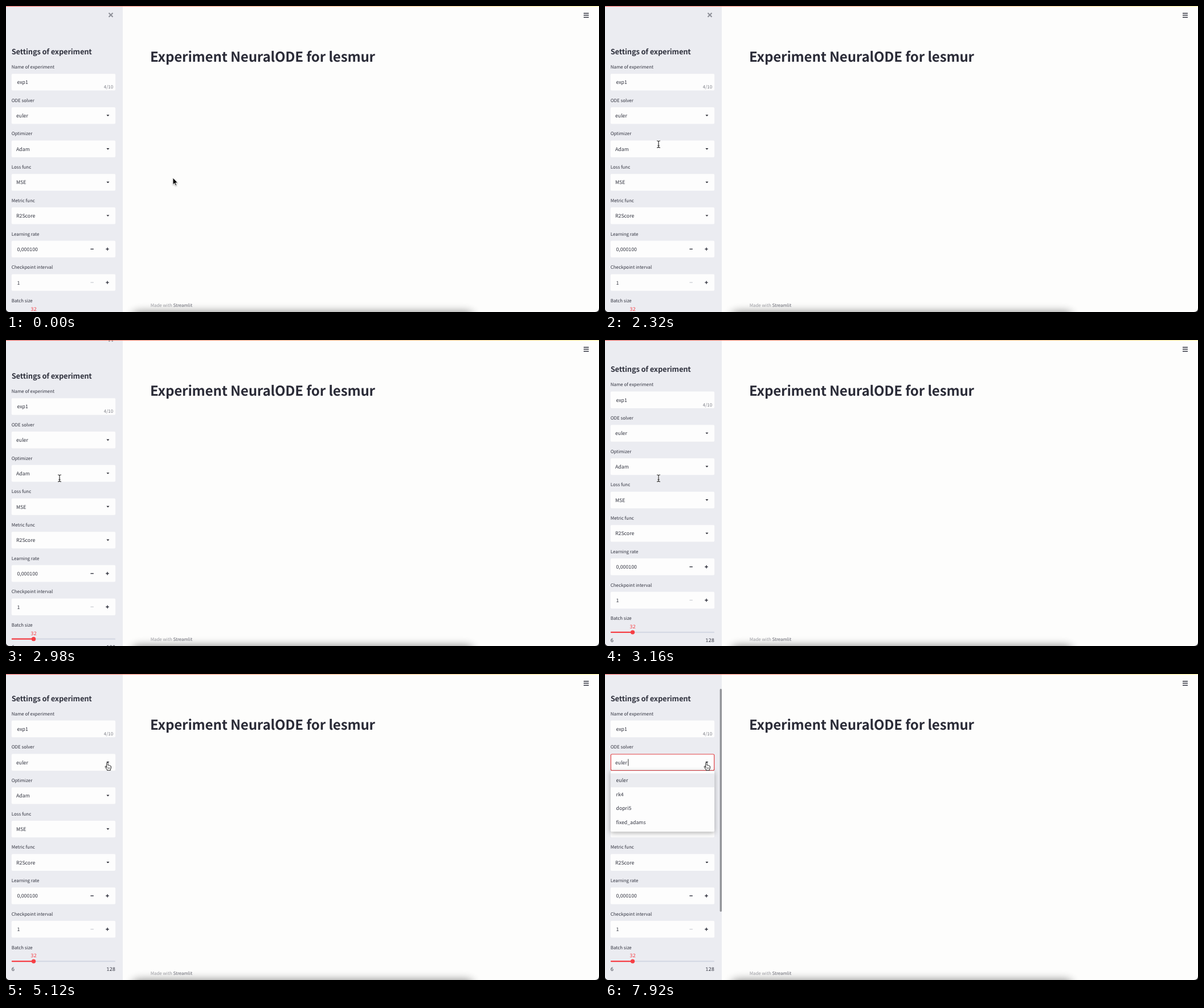
An HTML page for the animation above (8 s loop, 1041 by 538 pixels).

```html
<!DOCTYPE html>
<html lang="en">
<head>
<meta charset="utf-8">
<title>Experiment settings</title>
<style>
  html, body { margin: 0; width: 100%; height: 100%; overflow: hidden; background: #1c1c1e; }
  svg { display: block; width: 100vw; height: 100vh; }
  text {
    font: 8.74px "Noto Sans CJK JP", "Noto Sans CJK SC", "Noto Sans CJK", sans-serif;
    fill: #31333f;
    text-rendering: geometricPrecision;
  }
  .title { font-size: 24px; font-weight: 700; letter-spacing: -.005em; fill: #2a2b37; }
  .heading { font-size: 12.9px; font-weight: 700; letter-spacing: -.012em; }
  .label { font-size: 7.95px; }
  .small { font-size: 7.86px; }
  .mono { font: 8.78px "Noto Sans Mono", monospace; }
  .box { fill: #fdfdfd; }
  .line { fill: none; stroke: #31333f; stroke-width: 1.4; }
</style>
</head>
<body>
<svg viewBox="0 0 1041 538">
  <defs>
    <clipPath id="window"><path d="M0 0H1041V531Q1041 538 1034 538H7Q0 538 0 531Z"/></clipPath>
    <linearGradient id="rainbow">
      <stop offset="0" stop-color="#f36a66"/>
      <stop offset="1" stop-color="#fdf39a"/>
    </linearGradient>
  </defs>
  <g clip-path="url(#window)">
    <rect width="1041" height="538" fill="#fdfdfc"/>
    <text class="title" x="253" y="97.6">Experiment NeuralODE for lesmur</text>
    <text class="small" x="253.7" y="529" style="fill:#a0a1a7">Made with <tspan fill="#686974">Streamlit</tspan></text>
    <path class="line" d="M1014 12.8h9M1014 16.3h9M1014 19.8h9"/>
    <rect x="222" y="538" width="598" height="60" rx="10" opacity=".48" style="filter:blur(8px)"/>

    <rect width="205" height="538" fill="#ebecf1"/>
    <g id="panel">
      <path class="line" d="M180.5 12.3l7 7m0-7l-7 7" style="stroke:#8e9098;stroke-width:2"/>
      <text class="heading" x="9.7" y="85">Settings of experiment</text>
    </g>

    <g id="dropdown">
      <rect x="201.6" y="26" width="3.4" height="392" rx="1.7" fill="#929398"/>
      <rect x="10.3" y="141" width="181.4" height="28.6" rx="2" fill="none" stroke="#df3f43" stroke-width="1.2"/>
      <path d="M40.8 149.5v12" stroke="#222" stroke-width=".9"/>
      <rect class="box" x="9.8" y="170.2" width="182.3" height="107" rx="2"
            style="filter:drop-shadow(0 2.5px 4px rgba(0,0,0,.32))"/>
      <rect x="9.8" y="174.8" width="182.3" height="24.4" fill="#ebecf0"/>
    </g>

    <rect width="1041" height="1.1" fill="url(#rainbow)"/>
    <g id="pointer">
      <path id="arrow" d="M0 0V12.2L2.8 9.6L4.7 14L6.6 13.2L4.7 8.9H8.5Z"
            fill="#000" stroke="#fff" stroke-width=".9" style="filter:drop-shadow(0 1px 1px rgba(0,0,0,.3))"/>
      <g id="beam" fill="none">
        <path d="M-3-6Q-.2-6 0-4.6Q.2-6 3-6M0-4.8V4.8M-3 6Q-.2 6 0 4.6Q.2 6 3 6M-1.6 2.2H1.6"
              stroke="#fff" stroke-width="2.2"/>
        <path d="M-3-6Q-.2-6 0-4.6Q.2-6 3-6M0-4.8V4.8M-3 6Q-.2 6 0 4.6Q.2 6 3 6M-1.6 2.2H1.6"
              stroke="#222" stroke-width="1.1"/>
      </g>
      <g id="hand" stroke="#111" stroke-width=".95" stroke-linejoin="round">
        <path fill="#fff" d="M-2.3 6.6V-1.6Q-2.2-2.8-1.2-2.8Q-.1-2.8 0-1.6V2.4Q1.6 1.6 2 2.8Q3.5 2.3 3.9 3.5
          Q5.4 3.2 5.4 5V7Q5.2 8.5 4.4 9.8V11.3H-1.6V10Q-3 8.5-4.6 5.8Q-5.4 4.2-4.2 4Q-3.2 4-2.3 5.4Z"/>
        <path stroke-width=".6" d="M-.2 6.2v2.6M1.5 6.2v2.6M3.2 6.2v2.6"/>
      </g>
    </g>
  </g>
</svg>
<script>
const LOOP = 8000, ROW = 58.7, SCROLL = 37.4;
const START = [293, 302], FIELD = [94, 243], CARET = [179, 158];
const MOVE_TO_FIELD = [900, 1500], SCROLLING = [2800, 3500], MOVE_TO_CARET = [4300, 4900], OPEN_AT = 7120;

const byId = id => document.getElementById(id);
const panel = byId('panel'), dropdown = byId('dropdown'), pointer = byId('pointer');

function add(parent, tag, attributes, content = '') {
  const node = document.createElementNS('http://www.w3.org/2000/svg', tag);
  for (const [key, value] of Object.entries(attributes)) node.setAttribute(key, value);
  node.textContent = content;
  parent.append(node);
}
const write = (parent, x, y, content, extra) => add(parent, 'text', { x, y, ...extra }, content);
const stroke = (d, color = '#31333f') => add(panel, 'path', { d, class: 'line', style: `stroke:${color}` });

const fields = [
  ['Name of experiment', 'exp1', 'text'],
  ['ODE solver', 'euler', 'select'],
  ['Optimizer', 'Adam', 'select'],
  ['Loss func', 'MSE', 'select'],
  ['Metric func', 'R2Score', 'select'],
  ['Learning rate', '0,000100', 'number'],
  ['Checkpoint interval', '1', 'number'],
];

fields.forEach(([label, value, kind], i) => {
  const top = 119.2 + i * ROW, middle = top + 14.7;
  write(panel, 9.7, top - 9.2, label, { class: 'label' });
  add(panel, 'rect', { class: 'box', x: 9.8, y: top, width: 182.3, height: 29.4, rx: 2 });
  write(panel, kind === 'select' ? 18 : 19.5, middle + 3.4, value);
  if (kind === 'text') {
    write(panel, 188, top + 26, '4/10', { class: 'small', 'text-anchor': 'end', style: 'fill:#777982' });
  } else if (kind === 'select') {
    add(panel, 'path', { d: `M176.4 ${middle - 1.3}h5l-2.5 2.7z`, fill: '#262730' });
  } else {
    stroke(`M148.4 ${middle}h5.4`, value === '1' ? '#cfd1d7' : undefined);
    stroke(`M175.3 ${middle}h5.4m-2.7-2.7v5.4`);
  }
});

const red = '#f63f45', trackY = 542.5;
write(panel, 9.7, 521, 'Batch size', { class: 'label' });
write(panel, 48.5, 535.6, '32', { class: 'mono', 'text-anchor': 'middle', style: `fill:${red}` });
add(panel, 'rect', { x: 9.8, y: trackY - 1.2, width: 182.3, height: 2.4, rx: 1.2, fill: '#d5d9e4' });
add(panel, 'rect', { x: 9.8, y: trackY - 1.2, width: 38.7, height: 2.4, rx: 1.2, fill: red });
add(panel, 'circle', { cx: 48.5, cy: trackY, r: 3.7, fill: red });
write(panel, 9.8, 559.6, '6', { class: 'mono' });
write(panel, 192, 559.6, '128', { class: 'mono', 'text-anchor': 'end' });

['euler', 'rk4', 'dopri5', 'fixed_adams'].forEach((name, i) =>
  write(dropdown, 19.5, 190.4 + i * 24.4, name));

const progress = (t, [from, to]) => Math.min(1, Math.max(0, (t - from) / (to - from)));
const smooth = p => p * p * (3 - 2 * p);
const mix = (a, b, p) => a.map((v, i) => v + (b[i] - v) * p);
const show = (node, visible) => { node.style.display = visible ? '' : 'none'; };

function draw(t) {
  const scrolled = SCROLL * (1 - (1 - progress(t, SCROLLING)) ** 2);
  panel.setAttribute('transform', `translate(0 ${-scrolled})`);

  const toField = mix(START, FIELD, smooth(progress(t, MOVE_TO_FIELD)));
  const [x, y] = mix(toField, CARET, smooth(progress(t, MOVE_TO_CARET)));
  pointer.setAttribute('transform', `translate(${x} ${y})`);
  const leaving = t > MOVE_TO_CARET[0];
  const shape = leaving ? (x > 165 ? 'hand' : 'beam') : (x < 172 ? 'beam' : 'arrow');
  for (const id of ['arrow', 'beam', 'hand']) show(byId(id), id === shape);

  show(dropdown, t >= OPEN_AT);
}

function tick() {
  draw(performance.now() % LOOP);
  requestAnimationFrame(tick);
}
tick();
</script>
</body>
</html>
```
